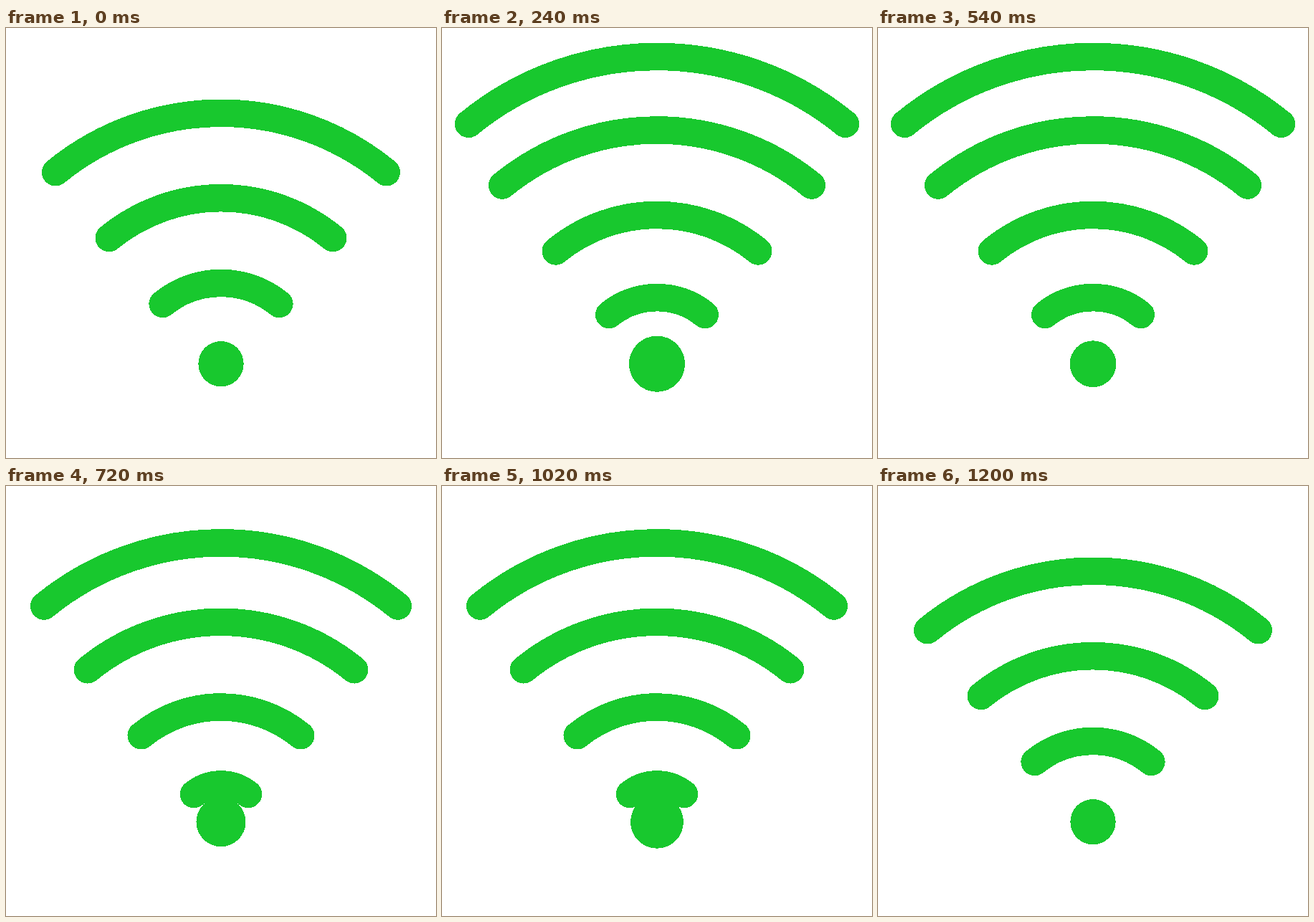
These frames come from a looping animation (600x600 px, 1230 ms). An HTML page:

```html
<!DOCTYPE html>
<html lang="en">
<head>
<meta charset="utf-8">
<title>Wireless signal</title>
<style>
  html, body { margin: 0; width: 100%; height: 100%; overflow: hidden; background: #fff; }

  svg {
    display: block;
    width: 100vw;
    height: 100vh;
    shape-rendering: crispEdges;
    /* Poses a wave passes through on its way up */
    --p0: path("M-9 460C-3.8 455.7 3.8 455.7 9 460");
    --p1: path("M-81.3 385C-34 346.3 34 346.3 81.3 385");
    --p2: path("M-156.2 293C-65.3 218.6 65.3 218.6 156.2 293");
    --p3: path("M-230.8 201.2C-96.5 91.3 96.5 91.3 230.8 201.2");
    --p4: path("M-271 117C-113.3 -12 113.3 -12 271 117");
  }

  .wave {
    fill: none;
    stroke: #18c82e;
    stroke-width: 38.5px;
    stroke-linecap: round;
    d: var(--from);
    animation: rise 1230ms steps(10, end) infinite;
  }
  .w1 { --from: var(--p0); --to: var(--p1); }
  .w2 { --from: var(--p1); --to: var(--p2); }
  .w3 { --from: var(--p2); --to: var(--p3); }
  .w4 { --from: var(--p3); --to: var(--p4); }

  .dot {
    fill: #18c82e;
    r: 31.65px;
    animation: pulse 1230ms cubic-bezier(.364, 0, .636, 1) infinite;
  }

  /* Four 300 ms cycles, then a 30 ms hold */
  @keyframes rise {
    0%, 24.39%, 48.78%, 73.17%, 97.56%, 100% { d: var(--from); }
    24.385%, 48.775%, 73.165%, 97.555% { d: var(--to); }
  }
  @keyframes pulse {
    0%, 48.78%, 97.56%, 100% { r: 31.65px; }
    24.39%, 73.17% { r: 39.85px; }
  }
</style>
</head>
<body>
<svg viewBox="0 0 600 600">
  <g transform="translate(300 0)">
    <path class="wave w4"/>
    <path class="wave w3"/>
    <path class="wave w2"/>
    <path class="wave w1"/>
    <circle class="dot" cy="468.7"/>
  </g>
</svg>
</body>
</html>
```
